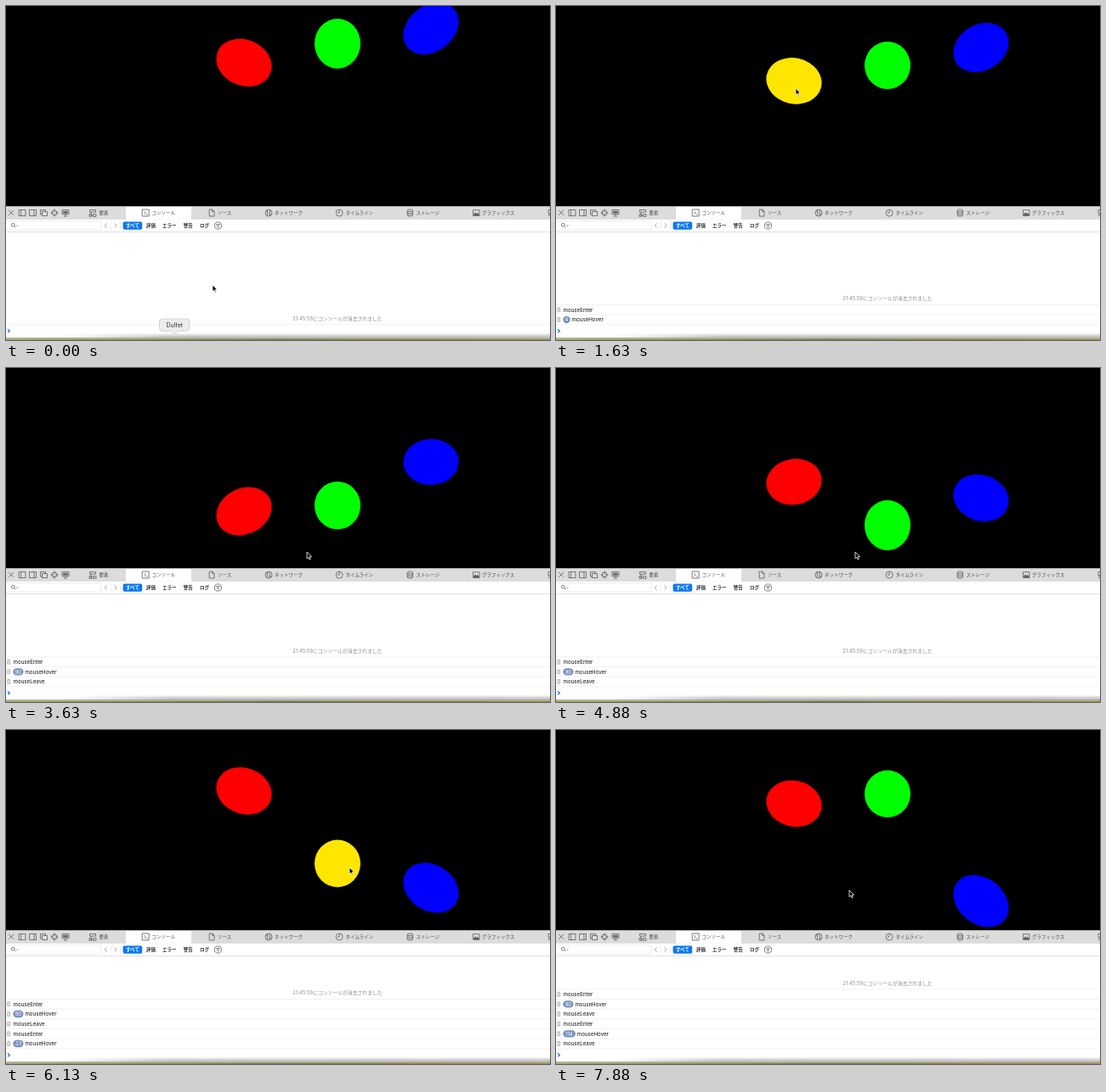
An HTML page that plays this animation: 640 px wide and 394 px high, repeating every 8 s.

```html
<!DOCTYPE html>
<html>
<head>
<meta charset="utf-8">
<title>Hover events</title>
<style>
  html, body { margin: 0; width: 100%; height: 100%; overflow: hidden; background: #000; }
  svg { display: block; width: 100vw; height: 100vh; }
  text { font-family: Inter, "Noto Sans CJK JP", "Noto Sans CJK", sans-serif; font-size: 5.5px; fill: #4c4c4c; white-space: pre; }
  .icon { fill: none; stroke: #5c5c5c; stroke-width: .8; }
  .log text { font-size: 6.2px; fill: #111; }
  .log .note { font-size: 5.85px; fill: #8c8c8c; }
  .log .count { font-size: 6px; fill: #fff; text-anchor: middle; }
  .filters text { font-weight: 600; fill: #333; }
</style>
</head>
<body>
<svg viewBox="0 0 640 394" preserveAspectRatio="none">
  <defs>
    <linearGradient id="shade" x2="0" y2="1">
      <stop offset="0" stop-color="#999" stop-opacity="0"/>
      <stop offset="1" stop-color="#999" stop-opacity=".75"/>
    </linearGradient>
    <linearGradient id="fade">
      <stop offset=".1" stop-color="#fff"/>
      <stop offset=".3" stop-color="#fff" stop-opacity="0"/>
    </linearGradient>
    <linearGradient id="desk">
      <stop offset="0" stop-color="#a3a562"/>
      <stop offset=".5" stop-color="#7d7f4c"/>
      <stop offset="1" stop-color="#96914f"/>
    </linearGradient>
  </defs>
  <rect width="640" height="394"/>
  <g id="balls"></g>

  <rect y="236.5" width="640" height="158" fill="#fff"/>
  <rect y="236.5" width="640" height="14.8" fill="#dcdcdc"/>
  <rect x="141" y="237" width="77" height="14.5" fill="#fff"/>
  <path d="M0 251.3H141M218 251.3H640" stroke="#c9c9c9" stroke-width=".6"/>
  <path d="M0 266.5H640" stroke="#d4d4d4" stroke-width=".7"/>

  <g class="icon">
    <path d="M3.2 240.8l6 6m0-6l-6 6"/>
    <path d="M15 240.5h8v7h-8zM17.6 240.5v7M27.5 240.5h8v7h-8zM33 240.5v7"/>
    <path d="M42.5 246h-2v-5.5h6v2M42.5 242.5h6v5h-6z"/>
    <circle cx="57" cy="244" r="3"/>
    <path d="M57 239.5v3.4m0 2.2v3.4M52.5 244h3.4m2.2 0h3.4"/>
    <path d="M66 240.5h8v5.2h-8zM68 248h4M70 245.7v2" />
    <path d="M67.5 242.3h5v1.8h-5z" fill="#5c5c5c"/>
    <path d="M98.5 240.5h7v2.6h-7zM100 243v4.3h2M102.5 245.7h3.5v2.6h-3.5zM98 245.7h2.5v2.6h-2.5z"/>
    <path d="M160.2 240h8v8h-8zM162.5 242l2 2-2 2M165 246h1.6"/>
    <path d="M239.2 240h3.6l2.2 2.2v5.8h-5.8zM242.6 240v2.4h2.4"/>
    <circle cx="309" cy="244" r="4"/>
    <path d="M307.7 247v-6l-1.3 1.6M310.3 241v6l1.3-1.6"/>
    <circle cx="392.2" cy="244" r="4"/>
    <path d="M392.2 241v3h-2.2"/>
    <ellipse cx="475.4" cy="241.3" rx="3.2" ry="1.3"/>
    <path d="M472.2 241.3v5.5c0 1.7 6.4 1.7 6.4 0v-5.5M472.2 243.2c0 1.7 6.4 1.7 6.4 0M472.2 245.1c0 1.7 6.4 1.7 6.4 0"/>
    <path d="M549.5 240.7h7.5v6.6h-7.5z"/>
    <path d="M550 247l2-3.2 1.6 1.6 1.3-1.2 1.8 2.8z" fill="#5c5c5c"/>
    <path d="M640 240.5h-2v4h2M640 246h-1.2v2"/>
    <circle cx="8.3" cy="258.2" r="1.9"/>
    <path d="M9.7 259.6l1.7 1.7M12.3 258.6l1 1 1-1"/>
    <path d="M118.6 256.2l-2.3 2.8 2.3 2.8M127.7 256.2l2.3 2.8-2.3 2.8" stroke="#999"/>
    <path d="M1 253.8H112M1 264H112M112 253.8V264M123.3 254v10M134.5 254v10" stroke="#dedede" stroke-width=".6"/>
    <circle cx="249.4" cy="259" r="4.1"/>
    <path d="M246.9 257.6h5m-4.2 1.6h3.4m-2.6 1.6h1.8"/>
  </g>
  <g id="tabs"></g>
  <rect x="137.6" y="254.6" width="22.6" height="9.2" rx="2" fill="#0a78f0"/>
  <g id="filters" class="filters"></g>

  <g id="log" class="log"></g>
  <path d="M2 381.2l2.4 2.3L2 385.8" fill="none" stroke="#1673e6" stroke-width="1.2"/>

  <rect y="385.5" width="640" height="6" fill="url(#shade)"/>
  <rect y="385.5" width="640" height="5.5" fill="url(#fade)"/>
  <rect y="391" width="640" height="1.4" fill="#b5b5b5"/>
  <rect y="392.3" width="640" height="1.7" fill="url(#desk)"/>

  <g id="tip">
    <path d="M184 369h28.500a3.500 3.500 0 0 1 3.500 3.500v7.500a3.500 3.500 0 0 1-3.500 3.500h-10l-4 4.200-4-4.200h-10.500a3.500 3.500 0 0 1-3.500-3.500v-7.500a3.500 3.500 0 0 1 3.500-3.500z" fill="#ececec" stroke="#c6c6c6" stroke-width=".7"/>
    <text x="198.300" y="378.800" text-anchor="middle" style="font-size:7px;fill:#333">Dulfet</text>
  </g>
  <path id="pointer" d="M0 0V7.800L1.800 6.200 3 9 4.300 8.400 3.100 5.700H5.500Z" fill="#000" stroke="#fff" stroke-width=".8" stroke-linejoin="round"/>
</svg>
<script>
const LOOP = 8000, STEP = 125;
const ORIGIN = { x: 390, y: 114 }, UNIT = 55, RADIUS = 27;
const HOVER_RATE = 60.5;

const $ = id => document.getElementById(id);
const label = (x, y, text, attrs = '') => `<text x="${x}" y="${y}" ${attrs}>${text}</text>`;

// speed in rad/s, zero = moment of passing the horizon on the way down
const balls = [
  { x: -2, swing: 1, speed: 1, zero: 2.11, color: '#f00' },
  { x: 0, swing: 1.3, speed: .7, zero: 2.57, color: '#0f0' },
  { x: 2, swing: 1.6, speed: .398, zero: 3.715, color: '#00f' },
];
const hovers = [
  { ball: balls[0], enter: 1.56, leave: 3.05, total: 90 },
  { ball: balls[1], enter: 5.596, leave: 7.49, total: 114 },
];
const pointerPath = [
  [0, 243, 329], [.25, 245, 322], [1, 266, 220], [1.5, 281, 118], [1.625, 282, 97],
  [1.9, 282, 101], [2.4, 282, 130], [3, 282, 130], [3.5, 354, 217], [4, 354, 217],
  [4.5, 352, 217], [5.4, 352, 217], [5.625, 372, 190], [5.9, 404, 163], [6.125, 404, 162],
  [6.75, 400, 136], [7.3, 388, 114], [7.5, 361, 128], [7.875, 345, 189],
];

$('tabs').innerHTML = [
  [109.5, '要素'], [171.5, 'コンソール'], [249, 'ソース'], [316, 'ネットワーク'],
  [399.5, 'タイムライン'], [482.5, 'ストレージ'], [560, 'グラフィックス'],
].map(([x, s]) => label(x, 246.1, s)).join('');
$('filters').innerHTML = [
  [141, 'すべて'], [165, '評価'], [184, 'エラー'], [208.7, '警告'], [228, 'ログ'],
].map(([x, s], i) => label(x, 261, s, i ? '' : 'style="fill:#fff"')).join('');

for (const ball of balls) {
  ball.node = document.createElementNS('http://www.w3.org/2000/svg', 'ellipse');
  ball.node.setAttribute('ry', RADIUS);
  $('balls').append(ball.node);
}

// A sphere seen in perspective stretches away from the view centre.
function drawBall(ball, t) {
  const x = ball.x, y = ball.swing * Math.sin(ball.speed * (t - ball.zero));
  const stretch = Math.sqrt(1 + (x * x + y * y) / 8.75);
  const angle = Math.atan2(y, x) * 180 / Math.PI;
  const hovered = hovers.some(h => h.ball === ball && t >= h.enter && t < h.leave);
  ball.node.setAttribute('rx', RADIUS * stretch);
  ball.node.setAttribute('fill', hovered ? '#ffe600' : ball.color);
  ball.node.setAttribute('transform',
    `translate(${ORIGIN.x + x * UNIT} ${ORIGIN.y + y * UNIT}) rotate(${angle})`);
}

function logRows(t) {
  const rows = [];
  for (const h of hovers) {
    if (t < h.enter) continue;
    const running = Math.floor((t - h.enter) * HOVER_RATE + .05) + 1;
    const count = t >= h.leave ? h.total : Math.min(h.total, running);
    rows.push({ name: 'mouseEnter' }, { name: 'mouseHover', count });
    if (t >= h.leave) rows.push({ name: 'mouseLeave' });
  }
  return rows;
}

function drawRow({ name, count }, y) {
  let x = 8.5, badge = '';
  if (count > 1) {
    const width = [8.4, 12.2, 14.6][String(count).length - 1];
    badge = `<rect x="8.300" y="${y - 4.2}" width="${width}" height="8.400" rx="4.200" fill="#7891bd"/>`
      + label(8.3 + width / 2, y + 2.2, count, 'class="count"');
    x = 10.2 + width;
  }
  return `<path d="M0 ${y - 5.9}H640" stroke="#ebebeb" stroke-width=".7"/>`
    + `<path d="M1.800 ${y - 2.5}h2.800v5h-2.800zM2.500 ${y - 1}h1.400m-1.400 1.800h1.400" fill="none" stroke="#8c8c8c" stroke-width=".6"/>`
    + badge + label(x, y + 2.2, name);
}

function drawLog(t) {
  const rows = logRows(t), pitch = 11.65, last = 370;
  const top = last - pitch * rows.length;
  $('log').innerHTML = label(390, top + .6, '21:45:59にコンソールが消去されました', 'class="note" text-anchor="middle"')
    + rows.map((row, i) => drawRow(row, top + pitch * (i + 1))).join('')
    + '<path d="M0 375.800H640" stroke="#ebebeb" stroke-width=".7"/>';
}

function drawPointer(t) {
  const next = pointerPath.findIndex(p => p[0] > t);
  const b = pointerPath.at(next), a = next > 0 ? pointerPath[next - 1] : b;
  const k = a === b ? 0 : (t - a[0]) / (b[0] - a[0]);
  const mix = i => a[i] + (b[i] - a[i]) * k;
  $('pointer').setAttribute('transform', `translate(${mix(1)} ${mix(2)})`);
}

let shown = -1;
function draw(now) {
  const step = Math.floor(now % LOOP / STEP);
  if (step !== shown) {
    shown = step;
    const t = step * STEP / 1000;
    balls.forEach(ball => drawBall(ball, t));
    drawLog(t);
    drawPointer(t);
    $('tip').style.display = t < .25 ? '' : 'none';
  }
}

const start = performance.now();
function tick() {
  draw(performance.now() - start);
  requestAnimationFrame(tick);
}
tick();
</script>
</body>
</html>
```
